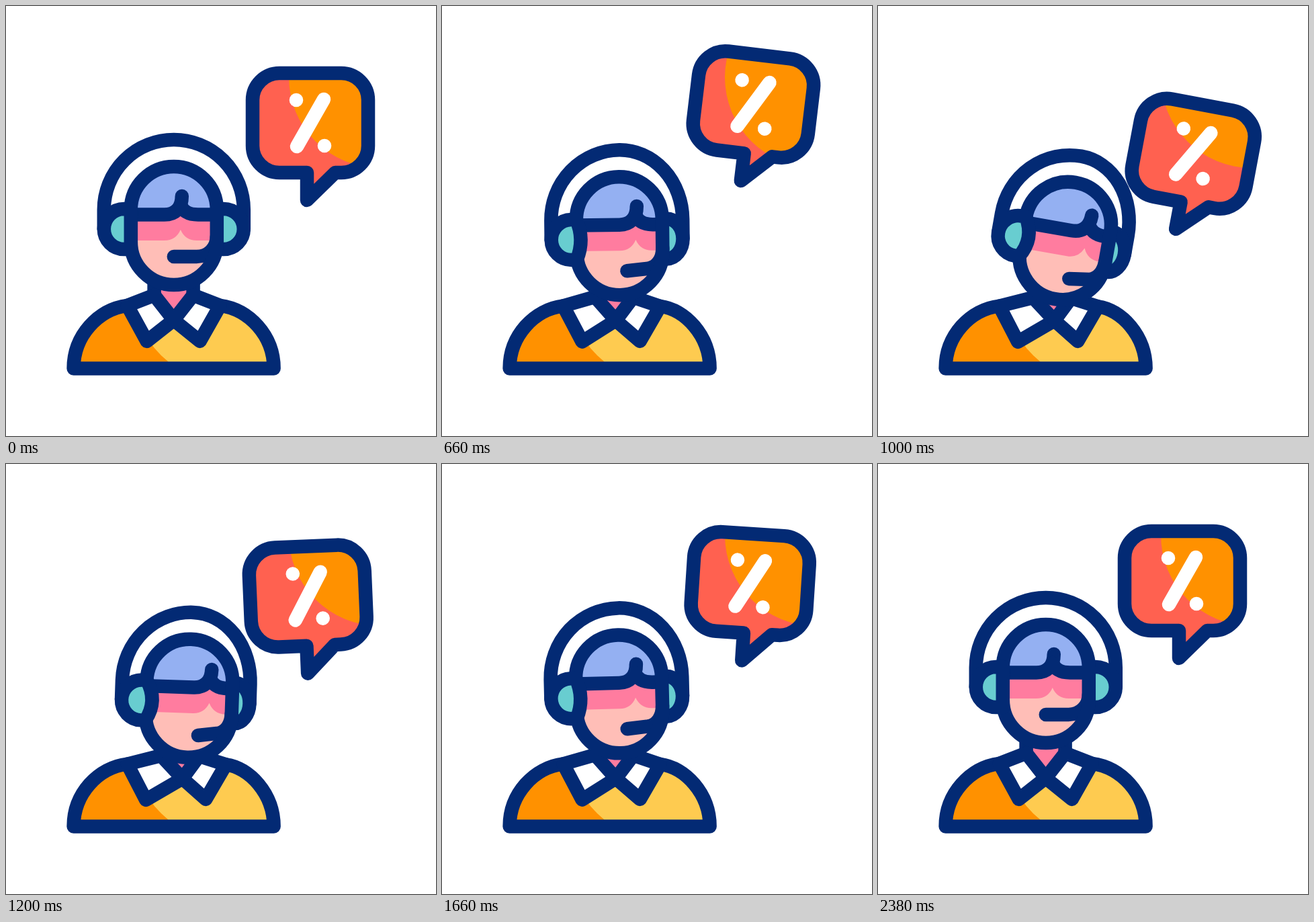
These frames come from a looping animation (640 px wide and 640 px high, 2400 ms). An HTML page with a canvas:

```html
<!DOCTYPE html>
<html lang="en">
<head>
<meta charset="utf-8">
<style>
  html, body { margin: 0; width: 100%; height: 100%; overflow: hidden; background: #fff; }
  canvas { display: block; }
</style>
</head>
<body>
<canvas id="stage" width="640" height="640"></canvas>
<script>
const ctx = document.getElementById('stage').getContext('2d');
const LOOP = 2400;
const NAVY = '#032a74', ORANGE = '#ff9100', RED = '#ff6150', YELLOW = '#fecb50',
  TEAL = '#68cdd0', BLUE = '#94b0f2', PINK = '#ff7c9f', SKIN = '#ffbeb7', WHITE = '#fff';

// Flat lists of time, value
const bubbleTurn = [0, 0, 440, -6, 840, 16, 1330, -6, 1700, 4, 2160, 0];
const bubbleDrop = [0, 0, 340, 56, 730, -35, 1050, 49, 1400, -18.5, 1800, 12, 2160, 0];
const headLook = [0, 0, 150, 0, 960, 1.45, 1380, 1.45, 2180, -0.1, 2400, 0];
const headTilt = [0, 0, 600, -1.3, 1000, 10, 1400, -6, 1720, -1, 2400, 0];

function valueAt(keys, t) {
  for (let i = 2; i < keys.length; i += 2) {
    if (t <= keys[i]) {
      const u = (t - keys[i - 2]) / (keys[i] - keys[i - 2]);
      return keys[i - 1] + (keys[i + 1] - keys[i - 1]) * (1 - Math.cos(Math.PI * u)) / 2;
    }
  }
  return keys[keys.length - 1];
}

function fill(d, color) {
  ctx.fillStyle = color;
  ctx.fill(new Path2D(d));
}

function line(d, color = NAVY) {
  ctx.strokeStyle = color;
  ctx.stroke(new Path2D(d));
}

function shape(d, color) {
  fill(d, color);
  line(d);
}

function dot(x, y, r, color) {
  ctx.fillStyle = color;
  ctx.beginPath();
  ctx.arc(x, y, r, 0, 7);
  ctx.fill();
}

function clipped(d, draw) {
  ctx.save();
  ctx.clip(new Path2D(d));
  draw();
  ctx.restore();
}

function pivot(x, y, degrees) {
  ctx.translate(x, y);
  ctx.rotate(degrees * Math.PI / 180);
}

function drawBody(k) {
  ctx.save();
  ctx.translate(-0.4, 0.4);
  const neckL = `${221 + 7 * k},${430 + 2.5 * k}`, neckR = `${279 + 6 * k},${430 + 3 * k}`;
  const vee = `${250 + 9 * k},${467 + k / 2}`;
  const shoulderL = `181,${445.5 + k / 2}`, shoulderR = `${319 + 6 * k},${445.5 + k}`;
  const neckTop = 405 + 10 * k;
  const neck = `M${neckL} L${221 + 10 * k},${neckTop} H${279 + 10 * k} L${neckR}`;
  fill(`${neck} L${vee}Z`, PINK);
  line(neck);

  const body = `M101,539 C101,490 138,451 ${shoulderL} L${neckL} L${vee} L${neckR} ` +
    `L${shoulderR} C362,451 399,490 399,539Z`;
  fill(body, YELLOW);
  clipped(body, () => fill('M90,430 H190 Q196,492 242,529 V540 H90Z', ORANGE));
  line(`M${shoulderL} C138,451 101,490 101,539 H399 C399,490 362,451 ${shoulderR}`);
  shape(`M${neckL} L${vee} L${210 - k},${498.5 + k * 0.7} L${shoulderL}Z`, WHITE);
  shape(`M${neckR} L${vee} L${289 + 6 * k},498.5 L${shoulderR}Z`, WHITE);
  ctx.restore();
}

function drawHead(k, tilt) {
  ctx.save();
  pivot(249.8 + 14.6 * k, 372 + 15 * k, tilt);
  ctx.translate(0, -45);

  const left = -104 + 2.5 * k, right = 104 - 9.5 * k, apex = 1.2 * k;
  shape(`M${left},5 V-24 A${apex - left},104 0 0 1 ${apex},-128 ` +
    `A${right - apex},104 0 0 1 ${right},-24 V5`, WHITE);

  const cupX = 74 - 4 * k, cupR = 30 - 5.5 * k;
  shape(`M60,-25 H${cupX} A${cupR},30 0 0 1 ${cupX},35 H60Z`, TEAL);

  const face = 'M-64,-24 A64,64 0 0 1 64,-24 V24 A64,64 0 0 1 -64,24Z';
  const h = 14 * k;
  clipped(face, () => {
    fill('M-70,-90 H70 V0 H-70Z', BLUE);
    fill('M-70,-16 H70 V90 H-70Z', PINK);
    fill(`M-70,22 H${h - 14} Q${h + 3},22 ${h + 10},6 Q${h + 17},22 ${h + 34},22 H70 V90 H-70Z`, SKIN);
  });
  line(`M-64,-16.5 H${h - 14} C${h + 2},-16.5 ${h + 12},-26 ${h + 12},-44`);
  line(`M${h + 10},-31 C${h + 14},-21 ${h + 22},-16.5 ${h + 36},-16.5 H64`);
  line(`M${10.5 * k},${46 + 6 * k} L${34 + 8 * k},${46 + 3 * k} ` +
    `C${51 + 4 * k},${46 + k} 64,${33 + 2 * k} 64,${16 + 3 * k}`);
  line(face);

  shape(`M-64,-25 H${left + 30} a30,30 0 0 0 0,60 H-64 Q${-64 + 12.6 * k},5 -64,-25Z`, TEAL);
  ctx.restore();
}

function drawBubble(turn, drop) {
  const bubble = 'M-46,-162 H46 a40,40 0 0 1 40,40 V-54 a40,40 0 0 1 -40,40 H37 ' +
    'L-5,27 V-14 H-46 a40,40 0 0 1 -40,-40 V-122 a40,40 0 0 1 40,-40Z';
  ctx.save();
  pivot(453, 262 + drop, turn);
  fill(bubble, RED);
  clipped(bubble, () => {
    ctx.resetTransform(); // the orange disc stays put while the bubble moves
    dot(556, 106, 135, ORANGE);
  });
  line(bubble);
  dot(-21, -122, 10.3, WHITE);
  dot(21, -54, 10.3, WHITE);
  line('M20,-123 L-20,-53', WHITE);
  ctx.restore();
}

function frame() {
  const t = performance.now() % LOOP;
  const look = valueAt(headLook, t);
  ctx.fillStyle = WHITE;
  ctx.fillRect(0, 0, 640, 640);
  ctx.lineWidth = 20.5;
  ctx.lineCap = ctx.lineJoin = 'round';
  drawBody(look);
  drawHead(look, valueAt(headTilt, t));
  drawBubble(valueAt(bubbleTurn, t), valueAt(bubbleDrop, t));
  requestAnimationFrame(frame);
}
frame();
</script>
</body>
</html>
```
